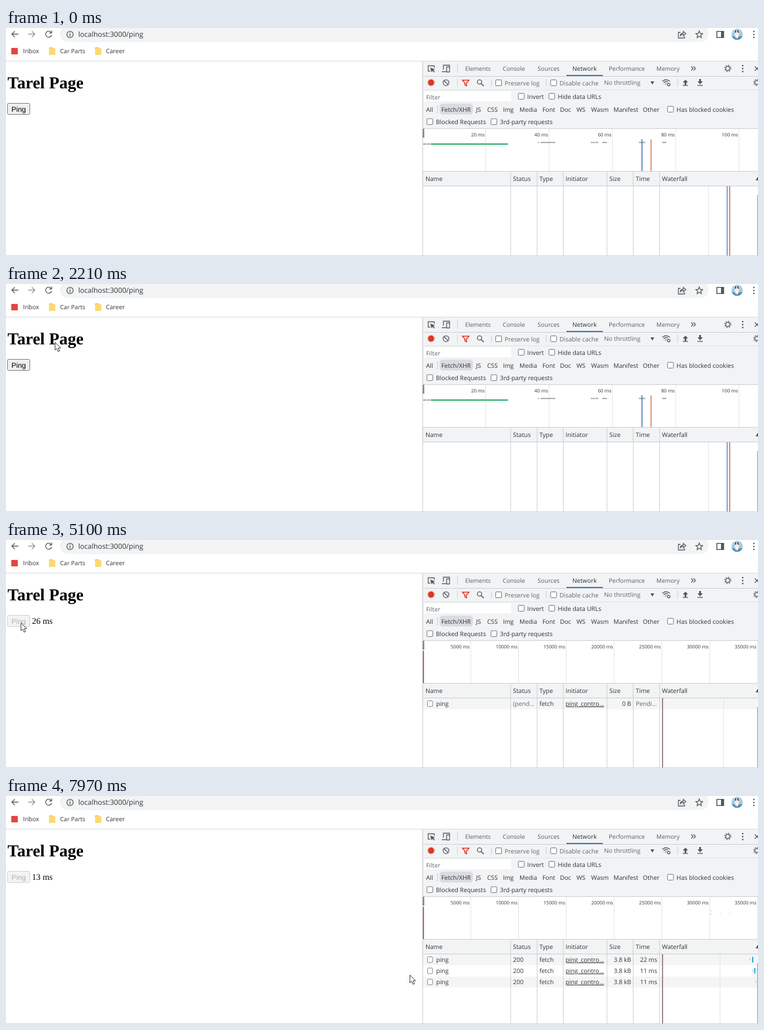
Write an HTML page that moves like this. It is 1280 px wide and 389 px high and loops after 8000 ms.

```html
<!DOCTYPE html>
<html lang="en">
<head>
<meta charset="utf-8">
<title>Ping</title>
<style>
html, body { margin: 0; width: 100%; height: 100%; overflow: hidden; background: #fff; }
svg { display: block; width: 100vw; height: 100vh; }
text { font-family: "Open Sans", "Noto Sans", sans-serif; font-size: 10.4px; fill: #303438; white-space: pre; text-rendering: geometricPrecision; }
.page { font-family: "Liberation Serif", serif; fill: #000; }
.btn { font-family: "Liberation Sans", sans-serif; font-size: 12.3px; }
.url { font-size: 12.1px; }
.tab { font-size: 10.15px; fill: #5a5e63; }
.dim { fill: #62666a; }
.tick { font-size: 8.2px; text-anchor: end; }
.end { text-anchor: end; }
.link { text-decoration: underline; }
.icon { fill: none; stroke: #54585c; stroke-width: 1.3; }
</style>
</head>
<body>
<svg id="stage" viewBox="0 0 1280 389"></svg>
<script>
const LOOP = 8000;
const BAR = '#f1f3f4', RULE = '#cbced1', GRID = '#e1e3e5', INK = '#54585c';

const rect = (x, y, w, h, fill, extra = '') =>
  `<rect x="${x}" y="${y}" width="${w}" height="${h}" fill="${fill}" ${extra}/>`;
const vline = (x, y1, y2, color = RULE, w = 1) => rect(x - w / 2, y1, w, y2 - y1, color);
const hline = (y, x1, x2, color = RULE) => rect(x1, y, x2 - x1, 1, color);
const text = (x, y, s, cls = '', extra = '') => `<text x="${x}" y="${y}" class="${cls}" ${extra}>${s}</text>`;
const icon = (d, extra = '') => `<path class="icon" d="${d}" ${extra}/>`;
const dot = (x, y, r, fill = INK) => `<circle cx="${x}" cy="${y}" r="${r}" fill="${fill}"/>`;
const ring = (x, y, r, extra = '') => `<circle class="icon" cx="${x}" cy="${y}" r="${r}" ${extra}/>`;
const dots = (x, y) => [-5, 0, 5].map(d => dot(x, y + d, 1.3)).join('');
const box = (x, y, label, cls = '') =>
  rect(x + .5, y + .5, 10, 10, '#fff', 'rx="1.5" stroke="#6e7276"') + text(x + 15.8, y + 9.6, label, cls);
const gear = (x, y) => ring(x, y, 3.4, 'stroke-width="2.4"') +
  ring(x, y, 5.3, 'stroke-width="1.8" stroke-dasharray="2.1 2.06"');

function browserBar() {
  const folder = x => rect(x, 33, 7, 5, '#edc65b', 'rx="1"') + rect(x, 34.5, 11, 11.5, '#fbd975', 'rx="1"');
  return rect(92, -4, 1104, 28, BAR, 'rx="14"') +
    icon('M21 10.5H10M15 5.5L10 10.5L15 15.5') +
    icon('M38 10.5H49M44 5.5L49 10.5L44 15.5', 'style="stroke:#929598"') +
    icon('M76.6 7.2A5.2 5.2 0 1 0 77.7 12M77.7 4.5V8.5H73.7') +
    ring(109, 11, 5.4) + rect(108.3, 10, 1.4, 4, INK) + rect(108.3, 7.6, 1.4, 1.4, INK) +
    text(123, 15.4, 'localhost:3000/ping', 'url') +
    icon('M1148 7.5H1144.5V17H1155V14M1147.5 13.5C1148 10 1150 8.7 1153 8.7V5.8L1157.3 9.7L1153 13.4V10.7C1150.5 10.7 1149 11.5 1147.5 13.5Z', 'stroke-width="1"') +
    icon('M1180 5.2L1181.7 9.1L1185.8 9.5L1182.7 12.3L1183.6 16.4L1180 14.2L1176.4 16.4L1177.3 12.3L1174.2 9.5L1178.3 9.1Z') +
    icon('M1210 5.8H1221.5V16.2H1210Z', 'style="stroke-width:1.6"') + rect(1217, 5.5, 5, 11, INK) +
    dot(1244.5, 11, 9.7, '#a9cbe3') +
    '<path d="M1235.5 14H1253.5A9.7 9.7 0 0 1 1235.5 14Z" fill="#5d91b7"/>' +
    '<ellipse cx="1244" cy="11.5" rx="3.4" ry="6" fill="#f4efe9"/>' +
    rect(1241, 4, 2, 4, '#5a4b42') + rect(1245, 4, 2, 4, '#5a4b42') +
    dots(1273, 11) +
    rect(9, 34, 11, 11, '#e2483b') + text(29, 43.2, 'Inbox') +
    folder(73) + text(92, 43.2, 'Car Parts', '', 'style="font-size:10.1px"') +
    folder(151.5) + text(170, 43.2, 'Career') +
    hline(56, 0, 1280, '#d9dbdd') + hline(388, 0, 1280, '#d3d5d7');
}

function tools() {
  const tabs = [[781.5, 'Elements'], [845.5, 'Console'], [905, 'Sources'], [1026, 'Performance'], [1107, 'Memory']];
  const types = [[715, 'All'], [741, 'Fetch/XHR'], [800, 'JS'], [819, 'CSS'], [846, 'Img'], [874, 'Media'], [913, 'Font'],
    [943, 'Doc'], [971, 'WS'], [996, 'Wasm'], [1034, 'Manifest'], [1084, 'Other']];
  const arrow = (x, up) => `<path d="M${x} ${up ? 88 : 96}l4.5 ${up ? 5 : -5}h-3v${up ? 4 : -4}h-3v${up ? -4 : 4}h-3Z" fill="${INK}"/>` + rect(x - 4.5, 97.3, 9, 1.3, INK);
  return rect(709, 57, 571, 114, BAR) + hline(82, 709, 1280) + hline(105, 709, 1280, GRID) +
    icon('M722 73.5H718.5V64.5H729V68') + '<path d="M722 67.5L730.5 70.7L727.3 72L730 75L728.6 76L726 73L724.3 75.8Z" fill="#54585c"/>' +
    icon('M744.5 71V63.5H755V66M742 74.5H749M750 66.5H755V75H750Z') + vline(768.5, 63, 76) +
    tabs.map(([x, s]) => text(x, 73.2, s, 'tab')).join('') +
    text(964, 73.2, 'Network') + rect(954, 80, 62, 2, '#3478c6') +
    icon('M1166.5 65.5L1169.5 69L1166.5 72.5M1170.5 65.5L1173.5 69L1170.5 72.5') +
    gear(1228.5, 69) + dots(1254, 69.3) + icon('M1274.5 65.5L1282 73M1274.5 73L1282 65.5') +
    dot(723.5, 93, 7, '#f4d0ca') + dot(723.5, 93, 5.2, '#d93a22') +
    ring(749, 93.3, 5) + icon('M745.5 89.8L752.5 96.8') + vline(768.5, 87, 100) +
    icon('M777 89H788L783.8 94V98.5L781.2 97V94Z', 'style="stroke:#d93a22;stroke-width:1.6"') +
    ring(806, 92, 3.7) + icon('M808.7 94.7L813 99', 'style="stroke-width:1.7"') + vline(826.5, 87, 100) +
    box(833, 88, 'Preserve log', 'dim') + vline(919.5, 87, 100) + box(926.5, 88, 'Disable cache', 'dim') +
    text(1018, 97.4, 'No throttling', 'dim') + '<path d="M1097 91H1103.5L1100.2 96.5Z" fill="#54585c"/>' +
    icon('M1117 91Q1123.5 85.5 1130 91M1119.3 93.7Q1123.5 90 1126.5 92.5M1121.7 96Q1123 95 1124 95.5') +
    ring(1128, 96.5, 2.2, 'stroke-width="1.8"') + vline(1143.5, 87, 100) +
    arrow(1156.5, true) + arrow(1181.5, false) + gear(1278, 93) +
    rect(711, 108, 149, 17, '#fff') + text(715, 121.5, 'Filter', 'dim') +
    box(871.5, 111, 'Invert') + box(923.5, 111, 'Hide data URLs') +
    rect(738, 129, 56.5, 18.5, '#dadcdf', 'rx="5"') + vline(734.5, 131, 146) +
    types.map(([x, s]) => text(x, 142.5, s)).join('') +
    box(1125.5, 133, 'Has blocked cookies') +
    box(716, 154.3, 'Blocked Requests') + box(825, 154.3, '3rd-party requests');
}

function table() {
  const cols = [[714, 'Name'], [863, 'Status'], [908, 'Type'], [952.5, 'Initiator'], [1027, 'Size'], [1072, 'Time'], [1116.5, 'Waterfall']];
  return rect(709, 245, 571, 24, BAR) + [171, 244, 269].map(y => hline(y, 709, 1280)).join('') +
    cols.map(([x, s]) => text(x, 261.3, s)).join('') +
    '<path d="M1276 260L1279.5 254L1283 260Z" fill="#54585c"/>';
}
const columnLines = () => [859, 904, 948.5, 1023, 1067.5, 1112.5].map(x => vline(x, 245, 388)).join('') +
  vline(709.2, 57, 389, '#bfc3c7') + rect(709, 172, 3, 15, '#8c9094') + rect(1278.7, 285, 1.3, 103, '#a3a6a9');

function ruler(first, gap, unit, count) {
  let s = '';
  for (let i = 0; i < count; i++) {
    const x = first + gap * i;
    s += vline(x, 172, 244, GRID) + text(x - 1.8, 185, `${unit * (i + 1)} ms`, 'tick');
  }
  return s;
}

function idleView() {
  const strips = [[904, 4, '#c9cbcd'], [910, 25], [995.5, 3], [999, 3], [1003, 5], [1015, 8], [1077, 11], [1117, 7]];
  return ruler(816.6, 107.8, 20, 5) +
    rect(710, 197, 5, 2, '#9b9ea1') + rect(715.8, 197, 2.2, 2, '#9b9ea1') + rect(719, 197, 2.5, 2, '#d5533c') +
    rect(723, 197, 129, 2, '#23a566') + rect(852, 197, 2.5, 2, '#3b8fc4') +
    strips.map(([x, w, c = '#a3a6a8']) => rect(x, 194.3, w, 2, c)).join('') +
    vline(1082.5, 190, 244, '#3971b8', 1.6) + vline(1098, 190, 244, '#db6d5a', 1.5) +
    vline(1195.5, 270, 388, GRID) + vline(1227.5, 270, 388, '#4b79b4', 1.4) + vline(1231.8, 270, 388, '#c64f49', 1.4);
}

// started: rows listed, done: rows with an answer
function requests(started, done) {
  let s = ruler(791, 81.35, 5000, 7) + vline(710.4, 189, 244, '#b02d38', 1.8);
  if (done) s += rect(1199.5, 194.5, 1.2, 2, '#d5d7d9') + rect(1199.5, 200, 1.2, 2.5, '#d0d2d4');
  for (let i = 1; i < done; i++) s += rect(1199 + 16.3 * i, 200.5, 1.5, 1.5, '#d5d7d9');
  for (let i = 0; i < started; i++) {
    const y = 283 + 19 * i, ok = i < done, age = done - 1 - i;
    if (i % 2 === 0) s += rect(710, y - 13, 569, 18.7, '#f5f5f5');
    s += rect(717.5, y - 8.5, 8.5, 9.5, '#fff', 'rx="1" stroke="#808387"') + text(732.3, y, 'ping') +
      text(863, y, ok ? '200' : '(pend…', ok ? '' : 'dim') + text(908, y, 'fetch') +
      text(952.5, y, 'ping_contro…', 'link') + text(1064, y, ok ? '3.8 kB' : '0 B', 'end') +
      (ok ? text(1108.5, y, i ? '11 ms' : '22 ms', 'end') : text(1072, y, 'Pendi…', 'dim'));
    if (ok) s += rect(1275.5 - 5 * age, y - 6, 1.2, 4, '#bfc6ca');
    if (ok && age) s += done === 2 ? rect(1275.5, y - 8.5, 1.4, 9, '#7f9fb5') : rect(1276.8 - 3.4 * age, y - 8.5, 2, 9.5, '#1ba8e0');
  }
  return s + vline([1221.5, 1217.8, 1215.3][started - 1], 270, 388, GRID) + vline(1117.5, 270, 388, '#76595d', 1.5);
}

// start, end and number of cursor updates in each move
const MOVES = [[110, 870, 12], [940, 1610, 11], [2080, 2830, 12], [2900, 3440, 9], [5650, 5780, 3], [6300, 7070, 12], [7140, 7970, 13]];
const PATH = [[110, 986, 380], [390, 690, 312], [630, 430, 241], [870, 229, 189], [940, 186, 178], [1075, 122, 160],
  [1208, 82, 151], [1410, 45, 145], [1610, 24, 140], [2080, 50, 115], [2285, 148, 68], [2420, 166, 95], [2560, 140, 135],
  [2640, 88, 154], [2760, 42, 140], [2830, 28, 122], [2900, 17, 140], [2968, 13, 154], [3035, 14, 157], [3440, 25, 141],
  [5650, 30, 142], [5780, 46, 141.5], [6300, 53.5, 145], [6580, 140, 172], [6840, 235, 198], [7070, 309, 214],
  [7140, 319, 216], [7278, 348, 224], [7490, 420, 243], [7700, 525, 270], [7900, 649, 299], [7970, 687, 305]];

function cursorAt(t) {
  const move = MOVES.filter(m => m[0] <= t).pop();
  if (!move) return null;
  const [from, to, n] = move, step = (to - from) / (n - 1);
  const time = from + Math.min(n - 1, Math.floor((t - from) / step + .05)) * step;
  const j = PATH.findIndex(p => p[0] >= time - .01);
  const b = PATH[j], a = PATH[Math.max(0, j - 1)];
  const u = b === a ? 1 : (time - a[0]) / (b[0] - a[0]);
  return [a[1] + (b[1] - a[1]) * u, a[2] + (b[2] - a[2]) * u];
}

const stage = document.getElementById('stage');
stage.innerHTML = rect(0, 0, 1280, 389, '#fff') + browserBar() +
  text(2.5, 103, 'Tarel Page', 'page', 'style="font-size:28.6px;font-weight:bold"') +
  rect(2.5, 128.5, 38, 19, '#efefef', 'id="face" rx="2"') + text(9.3, 143, 'Ping', 'btn', 'id="label"') +
  text(44.3, 143, '', 'page', 'id="result" style="font-size:14.5px"') +
  tools() + table() + '<g id="data"></g>' + columnLines() +
  '<path id="arrow" d="M.5 .5V13.7L3.5 11L5.8 16.3L8.2 15.2L5.9 10.2H10.2Z" fill="#fff" stroke="#333" stroke-width="1"/>' +
  '<path id="beam" d="M-4 -8H-1L0 -7L1 -8H4M0 -7V7M-4 8H-1L0 7L1 8H4" fill="none" stroke="#111" stroke-width="1.4"/>';
const $ = id => document.getElementById(id);
const [face, label, result, data, arrow, beam] = ['face', 'label', 'result', 'data', 'arrow', 'beam'].map($);
const count = (times, t) => times.filter(x => x <= t).length;

let shown = '';
function draw(t) {
  const started = count([5100, 6050, 7070], t), done = count([5170, 6100, 7140], t);
  if (shown !== started + '/' + done) {
    shown = started + '/' + done;
    data.innerHTML = started ? requests(started, done) : idleView();
    result.textContent = started ? (started > 1 ? '13 ms' : '26 ms') : '';
  }

  const pos = cursorAt(t);
  const inside = (x1, y1, x2, y2) => pos && pos[0] >= x1 && pos[0] <= x2 && pos[1] >= y1 && pos[1] <= y2;
  const off = t >= 4040, pressed = t >= 3840 && !off, hover = inside(2, 128, 41, 148);
  face.setAttribute('fill', off ? '#f3f3f3' : pressed ? '#f5f5f5' : hover ? '#e5e5e5' : '#efefef');
  face.setAttribute('stroke', off ? '#d0d0d0' : pressed ? '#8d8d8d' : hover ? '#4f4f4f' : '#767676');
  label.style.fill = off ? '#b0b0b0' : '#000';

  const overText = started ? inside(44, 130, 80, 149) : t >= 5100;
  arrow.style.display = pos && !overText ? '' : 'none';
  beam.style.display = pos && overText ? '' : 'none';
  if (pos) {
    const at = `translate(${Math.round(pos[0])} ${Math.round(pos[1])})`;
    arrow.setAttribute('transform', at);
    beam.setAttribute('transform', at);
  }
}

const t0 = performance.now();
function tick() {
  draw((performance.now() - t0) % LOOP);
  requestAnimationFrame(tick);
}
tick();
</script>
</body>
</html>
```
